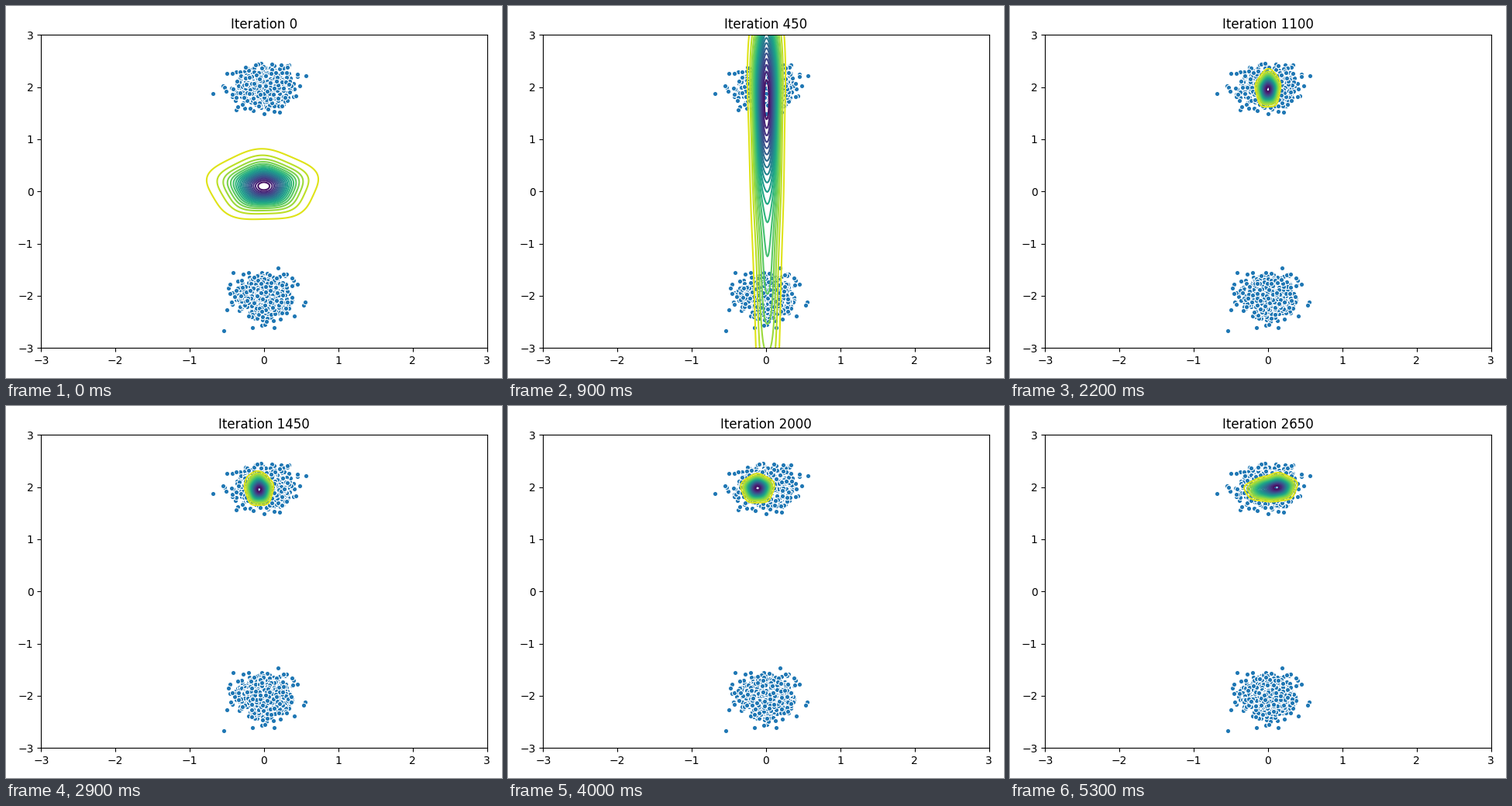
Write a matplotlib script that moves like this. It is 640x480 px and loops after 7.3 s.

```python
import numpy as np
import matplotlib.pyplot as plt
from matplotlib.animation import FuncAnimation

plt.rcParams["font.family"] = "DejaVu Sans"

STEP_MS, LOOP_MS = 100, 7300
LAST = 53                 # final training snapshot, held until the loop ends
ITERATIONS_PER_STEP = 50
SPREAD, COUNT = .17, 1000

# The generated density is a main blob plus a weaker tail blob.
# step: main (x, y, width, height), tail (weight, x, y, width, height)
POSES = {
    0: (0, .1, .22, .21, .35, -.02, .12, .40, .36),
    5: (-.01, 1.6, .115, 1.45, .55, .02, -1.6, .115, 1.8),
    13: (.02, 2.15, .09, .70, .16, .02, .2, .09, 2.3),
    22: (0, 1.95, .068, .14, .10, .02, 2.15, .06, .12),
    35: (-.12, 1.95, .085, .115, .12, -.22, 2.15, .10, .06),
    45: (-.11, 1.97, .095, .11, .35, .02, 1.95, .08, .11),
    LAST: (.14, 2, .105, .11, .55, -.06, 1.95, .12, .10),
}
LEVELS = np.linspace(.05, .95, 19)
xs, ys = np.meshgrid(np.linspace(-1, 1, 170), np.linspace(-3.2, 3.2, 420))


def blob(x, y, width, height):
    """Gaussian whose outer contours bulge in five directions."""
    p, q = (xs - x) / width, (ys - y) / height
    radius, angle = np.hypot(p, q), np.arctan2(q, p)
    bulge = .02 * np.minimum(radius, 3) * np.cos(5 * (angle - np.radians(20)))
    return np.exp(-(radius * (1 - bulge)) ** 2 / 2)


def density(step):
    pose = [np.interp(step, list(POSES), track) for track in zip(*POSES.values())]
    total = blob(*pose[:4]) + pose[4] * blob(*pose[5:])
    return total / total.max()


rng = np.random.default_rng(4)
samples = np.vstack([rng.normal((0, centre_y), SPREAD, (COUNT, 2))
                     for centre_y in (2, -2)])

fig, ax = plt.subplots(figsize=(6.4, 4.8), dpi=100)


def draw(frame):
    step = min(frame, LAST)
    ax.clear()
    # The data set is reshuffled at every snapshot.
    order = np.random.default_rng(step).permutation(len(samples))
    ax.scatter(*samples[order].T, s=20, color="C0", edgecolors="white",
               linewidths=.75)
    ax.contour(xs, ys, density(step), LEVELS, cmap="viridis_r",
               vmin=0, vmax=1, linewidths=1.5)
    ax.set(xlim=(-3, 3), ylim=(-3, 3),
           title=f"Iteration {step * ITERATIONS_PER_STEP}")
    fig.tight_layout()
    return []


anim = FuncAnimation(fig, draw, frames=LOOP_MS // STEP_MS, interval=STEP_MS,
                     init_func=lambda: [], repeat=True, repeat_delay=0)
plt.show()
```
